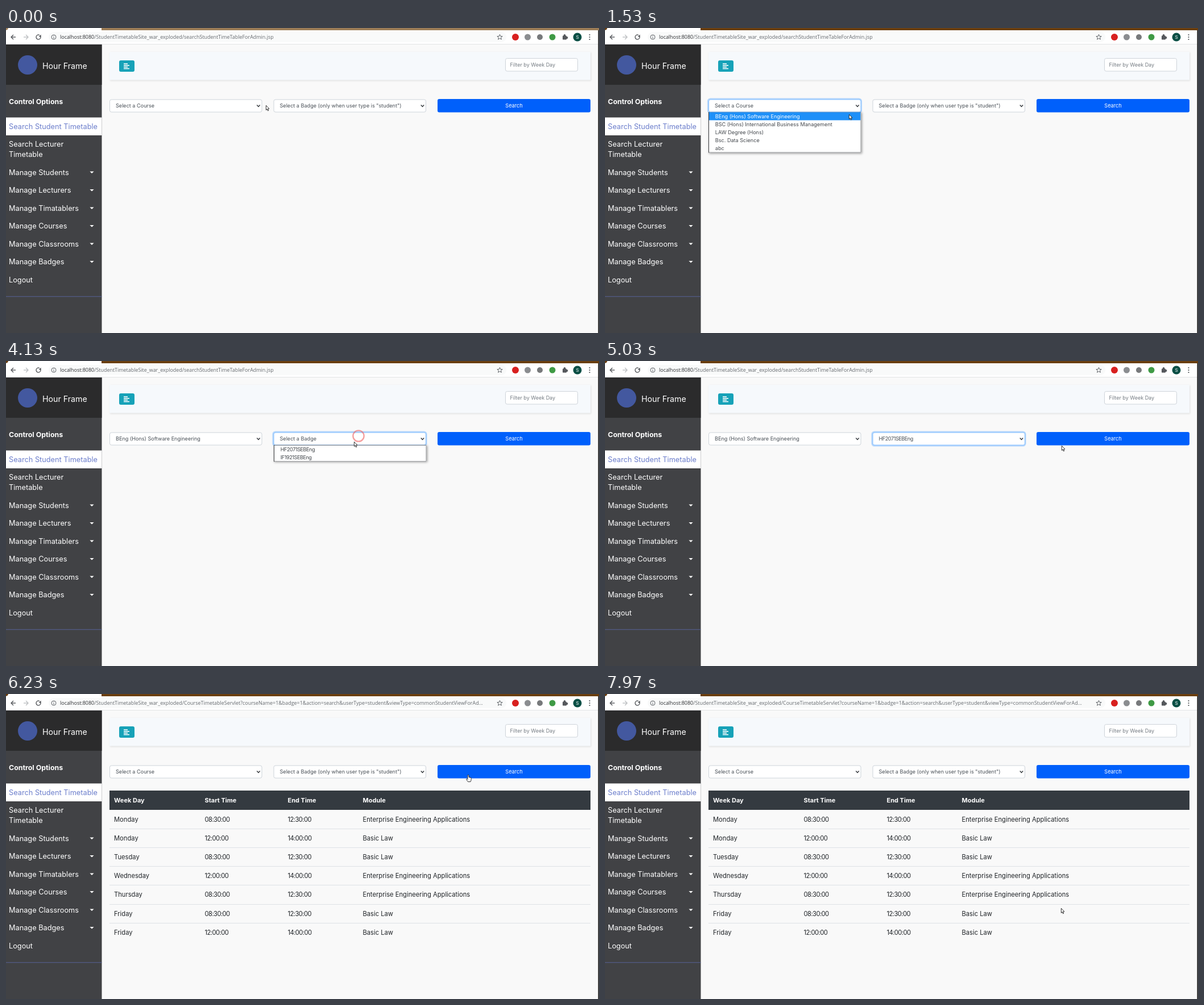
Write an HTML page with a canvas that moves like this. It is 1043 px wide and 537 px high and loops after 8 s.

```html
<!DOCTYPE html>
<html lang="en">
<head>
<meta charset="utf-8">
<title>Timetable search</title>
<style>
html, body { margin: 0; width: 100%; height: 100%; overflow: hidden; background: #f9f9f9; }
canvas { display: block; }
</style>
</head>
<body>
<canvas id="stage" width="1043" height="537"></canvas>
<script>
const ctx = document.getElementById('stage').getContext('2d');
const LOOP = 8000;
const UI = 'Inter, "Open Sans", sans-serif';
const URL_FONT = '"Open Sans", "Noto Sans", sans-serif';

// Moments when the page changes, in ms
const AT = { strip: 870, open1: 950, pick1: 2620, open2: 3890, pick2: 4480, search: 5450, load: 5720 };

// Pointer tip: time, x, y
const PATH = [
  [0, 457, 136], [600, 450, 138], [950, 442, 137], [1530, 429, 152], [2500, 426, 155],
  [3200, 426, 155], [3750, 618, 131], [3900, 620, 132], [4130, 612, 142], [4400, 606, 153],
  [4520, 606, 153], [5030, 803, 149], [5250, 811, 142], [6260, 812, 142], [6670, 835, 371],
  [7000, 720, 440], [7530, 785, 380], [7970, 802, 377]
];
const CLICKS = [
  [AT.open1, 442, 137], [AT.pick1, 426, 156], [AT.open2, 620, 132],
  [AT.pick2, 606, 154], [AT.search, 812, 142]
];

const MENU = [
  ['Search Lecturer', 204], ['Timetable', 222], ['Manage Students', 254, 1], ['Manage Lecturers', 285.5, 1],
  ['Manage Timatablers', 317, 1], ['Manage Courses', 348.5, 1], ['Manage Classrooms', 380, 1],
  ['Manage Badges', 411.5, 1], ['Logout', 443]
];
const COURSES = ['BEng (Hons) Software Engineering', 'BSC (Hons) International Business Management',
  'LAW Degree (Hons)', 'Bsc. Data Science', 'abc'];
const BADGES = ['HF2071SEBEng', 'IF1921SEBEng'];
const EEA = 'Enterprise Engineering Applications', LAW = 'Basic Law';
const EARLY = ['08:30:00', '12:30:00'], LATE = ['12:00:00', '14:00:00'];
const ROWS = [
  ['Monday', ...EARLY, EEA], ['Monday', ...LATE, LAW], ['Tuesday', ...EARLY, LAW],
  ['Wednesday', ...LATE, EEA], ['Thursday', ...EARLY, EEA], ['Friday', ...EARLY, LAW], ['Friday', ...LATE, LAW]
];
const COLS = [190, 349.5, 495.5, 627.5];

const SITE = '/StudentTimetableSite_war_exploded/';
const FORM_URL = SITE + 'searchStudentTimeTableForAdmin.jsp';
const RESULT_URL = SITE + 'CourseTimetableServlet?courseName=1&badge=1&action=search' +
  '&userType=student&viewType=commonStudentViewForAd...';

function rect(x, y, w, h, color) {
  ctx.fillStyle = color;
  ctx.fillRect(x, y, w, h);
}

function box(x, y, w, h, r, fill, stroke, line = 1) {
  ctx.beginPath();
  ctx.roundRect(x, y, w, h, r);
  if (fill) { ctx.fillStyle = fill; ctx.fill(); }
  if (stroke) { ctx.strokeStyle = stroke; ctx.lineWidth = line; ctx.stroke(); }
}

function disc(x, y, r, color) {
  ctx.beginPath();
  ctx.arc(x, y, r, 0, 7);
  ctx.fillStyle = color;
  ctx.fill();
}

function poly(points, fill, stroke, line = 1, close = false) {
  ctx.beginPath();
  points.forEach(([x, y]) => ctx.lineTo(x, y));
  if (close) ctx.closePath();
  if (fill) { ctx.fillStyle = fill; ctx.fill(); }
  if (stroke) { ctx.strokeStyle = stroke; ctx.lineWidth = line; ctx.stroke(); }
}

// y is the middle of the capitals
function text(str, x, y, size, color, { weight = 400, align = 'left', track = 0, font = UI } = {}) {
  ctx.font = `${weight} ${size}px ${font}`;
  ctx.textAlign = align;
  ctx.letterSpacing = track + 'px';
  ctx.fillStyle = color;
  ctx.fillText(str, x, y + size * 0.364);
}

function withShadow(color, blur, dx, dy, draw) {
  ctx.save();
  Object.assign(ctx, { shadowColor: color, shadowBlur: blur, shadowOffsetX: dx, shadowOffsetY: dy });
  draw();
  ctx.restore();
}

function arrow(x, dir, color) {
  poly([[x - 4 * dir, 16], [x + 4 * dir, 16]], null, color, 1.3);
  poly([[x, 12], [x + 4 * dir, 16], [x, 20]], null, color, 1.3);
}

function star(x, y) {
  const points = Array.from({ length: 10 }, (_, i) => {
    const a = i * Math.PI / 5 - Math.PI / 2, r = i % 2 ? 2.1 : 4.9;
    return [x + r * Math.cos(a), y + r * Math.sin(a)];
  });
  poly(points, null, '#5f6368', 1, true);
}

function browserBar(t) {
  const strip = t < AT.strip ? '#9c7d57' : '#6a3e0f';
  rect(0, 0, 1043, 29, '#ffffff');
  rect(168, 0, 875, 4, strip);
  poly([[0, 0], [4, 0], [3, 2.5], [0, 4]], strip);
  box(75, 7, 805, 18, 9, '#f9fafa');
  rect(0, 28, 1043, 1, '#e2e3e5');

  arrow(13, -1, '#4a4d51');
  arrow(35, 1, '#b9bbbe');
  ctx.beginPath();
  ctx.arc(57, 16, 4, -0.5, 5.2);
  ctx.strokeStyle = '#4a4d51';
  ctx.lineWidth = 1.3;
  ctx.stroke();
  poly([[61.5, 11.5], [61.5, 15.5], [57.5, 15.5]], '#4a4d51');

  box(80, 12, 8, 8, 4, null, '#5f6368');
  rect(83.5, 15.5, 1, 3, '#5f6368');
  rect(83.5, 13.5, 1, 1, '#5f6368');

  const host = 'localhost:8080';
  text(host, 95, 16, 8.93, '#2b2d30', { font: URL_FONT });
  const w = ctx.measureText(host).width;
  text(t < AT.load ? FORM_URL : RESULT_URL, 95 + w, 16, 8.93, '#666a6f', { font: URL_FONT });

  star(868.5, 16.2);
  disc(896, 16, 6, '#d8201f');
  disc(917.5, 16, 5.5, '#8b8d90');
  disc(939, 16, 5, '#77797b');
  disc(961, 16, 5.5, '#3f9a45');
  box(979, 13.5, 7, 7, 1, '#55585c');
  disc(982.5, 13, 1.9, '#55585c');
  disc(986.5, 17, 1.9, '#55585c');
  disc(1005, 16, 7.5, '#0a4f45');
  text('S', 1005, 16, 8, '#ffffff', { align: 'center' });
  [12, 16, 20].forEach(y => disc(1026.5, y, 1.1, '#4a4d51'));
}

function sidebar() {
  rect(0, 29, 168.5, 508, '#414245');
  rect(0, 29, 168.5, 71, '#2b2b2c');
  disc(38, 65, 17, '#43589f');
  text('Hour Frame', 64, 66.5, 14.2, '#ffffff');
  text('Control Options', 5, 129.3, 12.4, '#ffffff', { weight: 700 });
  rect(0, 157.5, 168.5, 31.5, '#ffffff');
  text('Search Student Timetable', 5, 173, 12.75, '#6d7fcc');
  for (const [label, y, caret] of MENU) {
    text(label, 5, y + 0.3, 12.75, '#ffffff');
    if (caret) poly([[147.4, y - 1.5], [154.6, y - 1.5], [151, y + 2.1]], '#ffffff');
  }
  rect(0, 472.3, 168.5, 1, '#58619a');
}

function navbar() {
  withShadow('rgba(0,0,0,.1)', 3, 1, 1, () => rect(182, 42, 846, 49.5, '#f6f9fc'));
  box(199, 57, 27, 20, 3, '#17a2b8');
  [7, 10, 7, 10].forEach((w, i) => rect(207, 62.3 + i * 2.8, w, 1.6, '#ffffff'));
  box(878.5, 53.5, 127, 22.5, 3, '#ffffff', '#ced4da');
  text('Filter by Week Day', 886.5, 64.5, 9, '#747b82');
}

function select(x, label, focus, track) {
  if (focus) box(x - 0.8, 124.7, 269.6, 24.6, 4, null, '#b5d6fb', 2.6);
  box(x + 0.5, 126, 267.5, 22, 3, '#ffffff', focus ? '#80bdff' : '#ced4da');
  text(label, x + 11, 137, 9.1, '#495057', { track });
  poly([[x + 259.3, 135.6], [x + 262, 138.4], [x + 264.7, 135.6]], null, '#32363a', 1.4);
}

function dropdown(x, items, tip, track = 0) {
  const h = items.length * 14.1 + 1;
  withShadow('rgba(0,0,0,.4)', 4, 1, 1, () => rect(x, 148, 268.5, h, '#ffffff'));
  box(x + 0.5, 148.5, 267.5, h - 1, 0, null, '#8f9194');
  items.forEach((item, i) => {
    const y = 148.3 + i * 14.1;
    const hot = tip.y >= y && tip.y < y + 14.1;
    if (hot) rect(x + 1, y, 266.5, 14.1, '#1e90f8');
    text(item, x + 11.8, y + 7, 9.1, hot ? '#ffffff' : '#44484d', { track });
  });
  rect(x, 148, 1, h, '#3c3e41');
}

function table() {
  rect(182, 170, 846, 34, '#343a40');
  ['Week Day', 'Start Time', 'End Time', 'Module'].forEach((h, i) =>
    text(h, COLS[i], 187, 11, '#ffffff', { weight: 700 }));
  ROWS.forEach((row, r) => {
    const y = 220.7 + r * 33.15;
    if (r) rect(182, Math.round(y - 16.9), 846, 1, '#dee2e6');
    row.forEach((cell, c) =>
      text(cell, COLS[c], y, 11.2, '#212529', { track: c === 1 || c === 2 ? -0.55 : 0 }));
  });
}

function form(t, tip) {
  const loaded = t >= AT.load;
  const picked = t >= AT.pick1 && !loaded;
  const chosen = t >= AT.pick2 && !loaded;
  const badge = chosen ? BADGES[0] : picked ? 'Select a Badge' : 'Select a Badge (only when user type is "student")';
  select(182, picked ? COURSES[0] : 'Select a Course', t >= AT.open1 && t < AT.open2);
  select(470.5, badge, t >= AT.open2 && t < AT.search, chosen ? -0.45 : 0);
  box(759, 125, 269, 23.5, 3, '#0060fb');
  text('Search', 893.5, 136.7, 9.2, '#ffffff', { align: 'center' });
  if (loaded) table();
  if (t >= AT.open1 && t < AT.pick1) dropdown(182, COURSES, tip);
  if (t >= AT.open2 && t < AT.pick2) dropdown(471, BADGES, tip, -0.45);
}

function pointerAt(t) {
  const i = PATH.findIndex(p => p[0] > t);
  if (i < 0) return { x: PATH.at(-1)[1], y: PATH.at(-1)[2] };
  const [t0, x0, y0] = PATH[i - 1], [t1, x1, y1] = PATH[i];
  const p = (t - t0) / (t1 - t0), k = p * p * (3 - 2 * p);
  return { x: x0 + (x1 - x0) * k, y: y0 + (y1 - y0) * k };
}

function rings(t) {
  for (const [start, x, y] of CLICKS) {
    const p = (t - start) / 500;
    if (p < 0 || p >= 1) continue;
    ctx.beginPath();
    ctx.arc(x, y, 20 * p, 0, 7);
    ctx.strokeStyle = `rgba(238,95,95,${Math.min(0.9, 2.2 * (1 - p) ** 2)})`;
    ctx.lineWidth = 2.4;
    ctx.stroke();
  }
}

function pointer({ x, y }) {
  const onButton = x > 759 && x < 1028 && y > 125 && y < 148.5;
  ctx.save();
  ctx.translate(x, y);
  ctx.lineJoin = 'round';
  if (onButton) {
    poly([[0, 1], [1, 0.2], [2, 1], [2, 4.5], [5.8, 5.4], [6.3, 6.4], [6, 10], [5, 12.5], [0.5, 12.5],
      [-2.3, 8.5], [-2, 7.5], [-1, 7.5], [0, 8.5]], '#ffffff', '#222222', 0.9, true);
  } else {
    poly([[0.4, 0.3], [0.4, 8.4], [2.2, 6.8], [3.5, 9.8], [4.8, 9.2], [3.5, 6.3], [6, 6.1]],
      '#ffffff', '#222222', 0.9, true);
  }
  ctx.restore();
}

function draw(t) {
  const tip = pointerAt(t);
  rect(0, 0, 1043, 537, '#f9f9f9');
  sidebar();
  navbar();
  form(t, tip);
  browserBar(t);
  rect(1041.5, 4, 1.5, 533, '#161616');
  rings(t);
  pointer(tip);
}

const begin = performance.now();
function tick() {
  draw((performance.now() - begin) % LOOP);
  requestAnimationFrame(tick);
}
tick();
</script>
</body>
</html>
```
